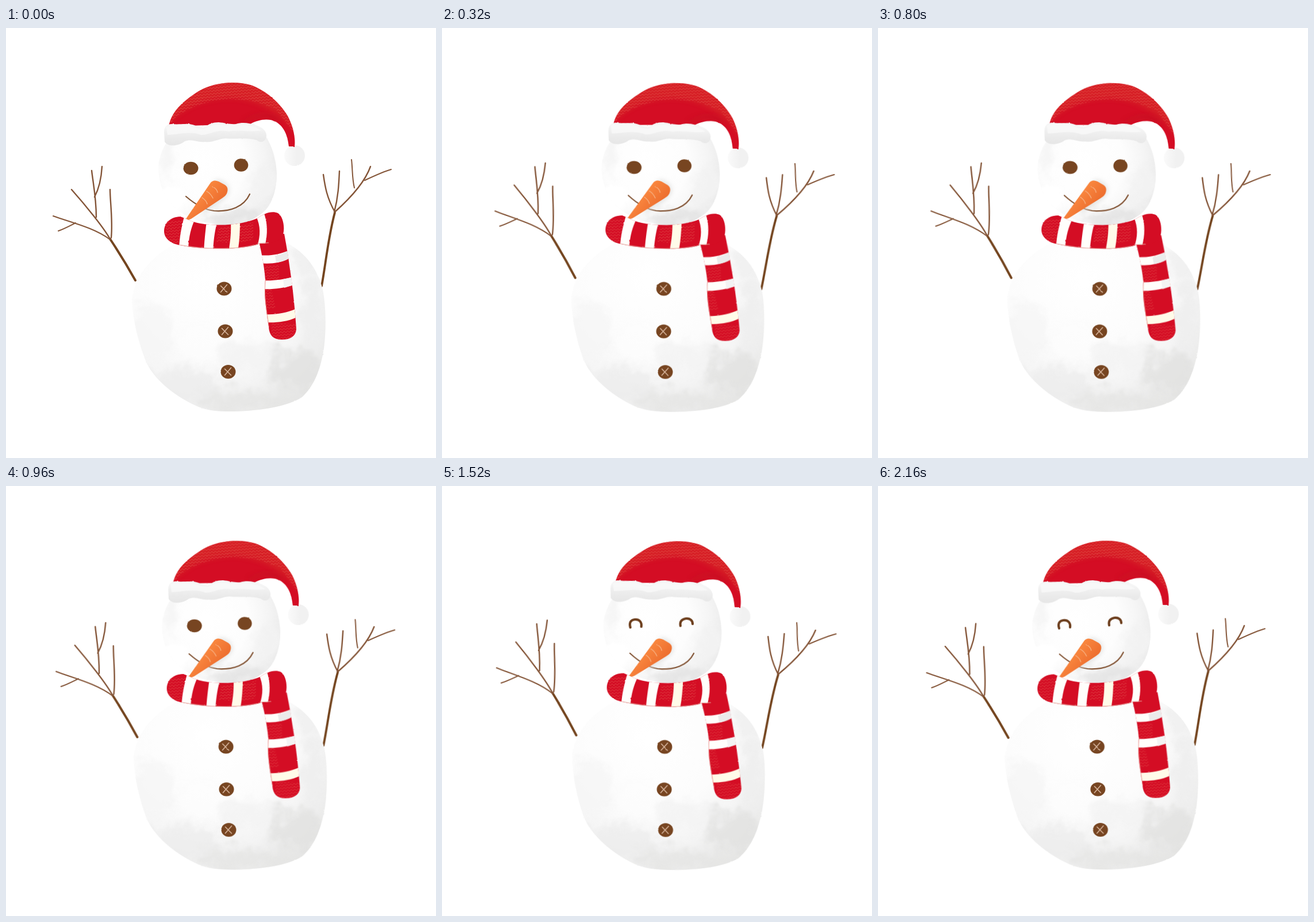
Animation of 748x748 px, one loop 2240 ms. Source, as an HTML page:

```html
<!DOCTYPE html>
<html lang="en">
<head>
<meta charset="utf-8">
<title>Swaying snowman</title>
<style>
  html, body { margin: 0; width: 100%; height: 100%; overflow: hidden; background: #fff; }
  svg { display: block; width: 748px; height: 748px; transform-origin: 374px 665px; animation: sway 1120ms steps(7, end) infinite; }
  .tail { transform-origin: 463px 368px; animation: swing 1120ms steps(7, end) infinite; }
  .open { animation: open 2240ms step-end infinite; }
  .shut { animation: shut 2240ms step-end infinite; }
  @keyframes sway { 0%, 100% { transform: rotate(0deg); } 50% { transform: rotate(3deg); } }
  @keyframes swing { 0%, 100% { transform: rotate(0deg); } 50% { transform: rotate(-5.5deg); } }
  @keyframes open { 0%, 100% { visibility: visible; } 50% { visibility: hidden; } }
  @keyframes shut { 0%, 100% { visibility: hidden; } 50% { visibility: visible; } }
  .line { fill: none; stroke-linecap: round; stroke-linejoin: round; }
  .red { fill: #d40d24; }
  .white { fill: #fffefb; }
  .cream { fill: #fffbe9; }
</style>
</head>
<body>
<svg viewBox="0 0 748 748">
  <defs>
    <filter id="rough" x="-10%" y="-10%" width="120%" height="120%" color-interpolation-filters="sRGB">
      <feTurbulence type="fractalNoise" baseFrequency=".2" numOctaves="2" seed="4"/>
      <feDisplacementMap in="SourceGraphic" scale="1.8" xChannelSelector="R" yChannelSelector="G"/>
    </filter>
    <filter id="wash" x="-20%" y="-20%" width="140%" height="140%" color-interpolation-filters="sRGB">
      <feGaussianBlur stdDeviation="7" result="soft"/>
      <feTurbulence type="fractalNoise" baseFrequency=".035" numOctaves="3" seed="9"/>
      <feDisplacementMap in="soft" scale="45" xChannelSelector="R" yChannelSelector="G"/>
    </filter>
    <filter id="blur" x="-30%" y="-30%" width="160%" height="160%"><feGaussianBlur stdDeviation="4"/></filter>
    <radialGradient id="snow" gradientUnits="userSpaceOnUse" cx="350" cy="435" r="262">
      <stop offset="0" stop-color="#fff"/><stop offset=".5" stop-color="#fcfcfc"/>
      <stop offset=".75" stop-color="#f4f4f4"/><stop offset="1" stop-color="#e7e7e6"/>
    </radialGradient>
    <radialGradient id="face" gradientUnits="userSpaceOnUse" cx="342" cy="235" r="134">
      <stop offset="0" stop-color="#fff"/><stop offset=".55" stop-color="#fdfdfd"/>
      <stop offset=".8" stop-color="#f5f5f5"/><stop offset="1" stop-color="#ececec"/>
    </radialGradient>
    <linearGradient id="fur" x2="0" y2="1">
      <stop offset=".2" stop-color="#f5f5f5"/><stop offset=".65" stop-color="#ebebeb"/><stop offset="1" stop-color="#e6e6e6"/>
    </linearGradient>
    <linearGradient id="puff"><stop offset="0" stop-color="#fafafa"/><stop offset=".6" stop-color="#f1f1f1"/></linearGradient>
    <linearGradient id="carrot" gradientUnits="userSpaceOnUse" x1="338" y1="290" x2="362" y2="310">
      <stop offset="0" stop-color="#f9873f"/><stop offset="1" stop-color="#ee7030"/>
    </linearGradient>
    <pattern id="knit" width="6" height="5" patternUnits="userSpaceOnUse" patternTransform="rotate(-6)">
      <path d="M0 0 3 3 6 0" fill="none" stroke="#f28a70" stroke-width="1"/>
    </pattern>
    <path id="hat" d="M283 171C288 145 307 128 335 110C360 95 396 91 425 99C452 108 477 131 490 153C499 170 504 190 502 206L492 206C490 188 484 171 469 163C455 156 438 160 425 167Z"/>
    <path id="neck" d="M275 353C276 337 287 329 303 328C313 331 321 337 338 340C376 346 415 341 437 331C448 323 462 317 473 322C484 329 486 354 480 364C472 373 457 375 442 375C414 386 350 387 303 378C286 375 275 366 275 353Z"/>
    <path id="drape" d="M438 362C443 384 449 410 451 438C448 461 452 486 457 520C458 535 465 542 480 542C495 542 504 536 505 524C503 493 499 452 494 420C491 397 488 380 484 358Z"/>
    <path id="body" d="M219 474C221 510 230 545 243 579C254 606 286 636 328 656C346 665 365 667 390 667C435 667 490 659 515 642C537 622 547 593 553 558C557 525 557 486 551 455C541 415 517 386 480 370L330 360C270 380 224 420 219 474Z"/>
    <path id="head" d="M265 244C266 213 287 175 325 166L430 166C455 182 470 218 471 253C471 287 460 316 438 327C420 341 390 347 357 340C305 333 266 300 265 244Z"/>
    <clipPath id="inHat"><use href="#hat"/></clipPath>
    <clipPath id="inNeck"><use href="#neck"/></clipPath>
    <clipPath id="inDrape"><use href="#drape"/></clipPath>
    <clipPath id="inBody"><use href="#body"/></clipPath>
    <clipPath id="inHead"><use href="#head"/></clipPath>
    <g id="button">
      <ellipse rx="13" ry="12" fill="#774521"/>
      <path class="line" d="M-6-5 5 6M5-7-6 6" stroke="#d9b79f" stroke-width="1.6"/>
    </g>
  </defs>

  <!-- twig arms -->
  <g class="line" stroke="#845538" stroke-width="2">
    <path d="M225 439C211 414 197 391 181 367" stroke="#74451f" stroke-width="4"/>
    <path d="M181 367C169 346 138 308 114 281M157 329C157 296 152 273 149 248M154 294C163 277 166 259 167 241M183 365C186 335 181 302 181 281" stroke-width="2.4"/>
    <path d="M181 368C153 347 112 338 82 327M91 353C102 349 111 344 121 339"/>
    <path d="M549 449C556 412 560 366 572 321" stroke="#74451f" stroke-width="3.8"/>
    <path d="M572 320C558 295 555 276 552 255M571 320C578 294 579 271 580 249M572 320C590 304 623 272 634 241" stroke-width="2.4"/>
    <path d="M606 278C602 262 603 246 601 229M624 265C641 257 656 250 670 246"/>
  </g>

  <!-- body -->
  <use href="#body" fill="url(#snow)" filter="url(#rough)"/>
  <g clip-path="url(#inBody)">
    <g filter="url(#wash)">
      <ellipse cx="252" cy="530" rx="42" ry="50" fill="#f6f6f6" opacity=".8"/>
      <ellipse cx="305" cy="620" rx="72" ry="28" fill="#ececec" opacity=".7"/>
      <ellipse cx="415" cy="648" rx="95" ry="17" fill="#e4e4e3" opacity=".75"/>
      <ellipse cx="502" cy="595" rx="46" ry="38" fill="#e2e2e0" opacity=".8"/>
      <ellipse cx="532" cy="500" rx="20" ry="62" fill="#eeeeee" opacity=".8"/>
      <ellipse cx="518" cy="405" rx="24" ry="30" fill="#efefef" opacity=".8"/>
      <ellipse cx="425" cy="570" rx="60" ry="22" fill="#f3f3f3" opacity=".8"/>
      <ellipse cx="335" cy="545" rx="42" ry="35" fill="#fdfdfd" opacity=".7"/>
    </g>
  </g>
  <g filter="url(#rough)">
    <use href="#button" x="379.5" y="453.5"/>
    <use href="#button" x="381.5" y="527.5"/>
    <use href="#button" x="386.5" y="598"/>
  </g>

  <!-- head -->
  <use href="#head" fill="url(#face)" filter="url(#rough)"/>
  <g clip-path="url(#inHead)">
    <g filter="url(#wash)">
      <ellipse cx="282" cy="222" rx="16" ry="30" fill="#f6f6f6"/>
      <ellipse cx="450" cy="275" rx="22" ry="38" fill="#f2f2f2"/>
      <ellipse cx="400" cy="332" rx="55" ry="15" fill="#e5e5e5"/>
      <ellipse cx="290" cy="300" rx="24" ry="32" fill="#fff"/>
    </g>
  </g>
  <g class="open" fill="#774521" filter="url(#rough)">
    <ellipse cx="321.5" cy="244" rx="13" ry="11.3"/>
    <ellipse cx="409" cy="238.5" rx="12.3" ry="11.3"/>
  </g>
  <g class="shut line" stroke="#6d3f1e" stroke-width="4.2">
    <path d="M312 248C309 239 313 235 319 234C327 233 332 238 331 246"/>
    <path d="M399 242C397 234 402 230 408 229C415 228 420 232 420 238"/>
  </g>
  <path class="line" d="M313 293C327 305 343 316 362 318C390 320 414 311 424 289" stroke="#835536" stroke-width="2.2"/>
  <path d="M364 264C378 263 390 272 388 286C382 299 360 313 340 326Z" fill="#d7d7d5" opacity=".65" filter="url(#blur)"/>
  <g filter="url(#rough)">
    <path d="M313 332L356 269Q361 263 370 267L381 273Q387 277 385 285Q384 291 376 296L322 332Q314 336 313 332Z" fill="url(#carrot)"/>
    <path class="line" d="M359 276C364 278 367 281 368 286M349 284C355 287 358 292 360 296M341 295C347 299 349 302 350 306" stroke="#f6b488" stroke-width="1.3"/>
  </g>

  <!-- scarf -->
  <g class="tail" filter="url(#rough)">
    <use href="#drape" class="red"/>
    <g clip-path="url(#inDrape)">
      <path d="M440 454H462L469 488H440ZM462 514H510V545H462ZM450 413H475V438H450Z" fill="url(#knit)" opacity=".35"/>
      <path class="white" d="M440 409V395C460 397 474 394 492 387V401C477 409 460 411 440 409Z"/>
      <path d="M468 396C477 395 484 391 492 387V401C485 405 478 407 470 408Z" fill="#ebebeb"/>
      <path class="white" d="M445 454V439C465 440 480 438 500 433V447C481 453 464 455 445 454Z"/>
      <path d="M482 437 500 433V447L484 452Z" fill="#f3f3f3"/>
      <path class="cream" d="M450 512V498C470 499 488 496 508 487V502C490 511 471 513 450 512Z"/>
      <path class="line" d="M451 438C448 461 452 486 457 520" stroke="#e8877f" stroke-width="2" opacity=".7"/>
    </g>
  </g>
  <g filter="url(#rough)">
    <use href="#neck" class="red"/>
    <g clip-path="url(#inNeck)">
      <path d="M278 334H308L300 374H278ZM370 346H391L388 373H366ZM407 344 430 338V368L405 374Z" fill="url(#knit)" opacity=".4"/>
      <path class="white" d="M310 328 328 334C322 348 318 362 317 385H301C302 362 305 348 310 328Z"/>
      <path class="white" d="M349 336H368C363 352 361 370 360 390H344C345 370 347 352 349 336Z"/>
      <path class="cream" d="M391 338H407C407 356 406 372 403 390H387C390 372 392 356 391 338Z"/>
      <path class="white" d="M435 327 448 320C455 338 456 358 450 380H437C443 360 443 345 435 327Z"/>
      <path class="line" d="M303 378C350 387 414 386 442 375L456 374" stroke="#e6a59e" stroke-width="2.5" opacity=".7"/>
    </g>
  </g>

  <!-- hat -->
  <circle cx="502" cy="222" r="18" fill="url(#puff)" filter="url(#rough)"/>
  <g filter="url(#rough)">
    <use href="#hat" class="red"/>
    <g clip-path="url(#inHat)">
      <path d="M282 170C302 142 340 125 380 123C428 121 462 140 495 172L515 200V85H282Z" fill="#d93a2c" opacity=".4" filter="url(#blur)"/>
      <path d="M282 170C302 144 340 128 380 125C428 123 440 130 468 140L515 200V85H282Z" fill="url(#knit)" opacity=".4"/>
      <path d="M415 166C430 152 455 151 478 166L474 156C455 143 430 150 415 160Z" fill="#bd1920" opacity=".5" filter="url(#blur)"/>
    </g>
  </g>
  <g filter="url(#rough)">
    <path d="M275 181C275 172 280 167 288 167C298 168 304 167 312 167C325 165 335 175 347 172C352 167 360 164 370 164C382 165 390 168 400 167C413 163 424 166 434 169C444 171 454 179 453 188C452 198 443 201 436 195C418 190 396 194 382 192C367 193 360 200 346 198C333 200 324 192 311 197C299 206 282 207 276 198Z" fill="url(#fur)"/>
    <path d="M279 173C292 165 302 170 315 169C324 170 330 177 345 176C355 169 369 166 383 170C402 166 428 168 444 178C422 182 404 176 387 180C367 175 354 186 340 186C323 179 305 184 281 186Z" fill="#fafafa" opacity=".75"/>
  </g>
</svg>
</body>
</html>
```
